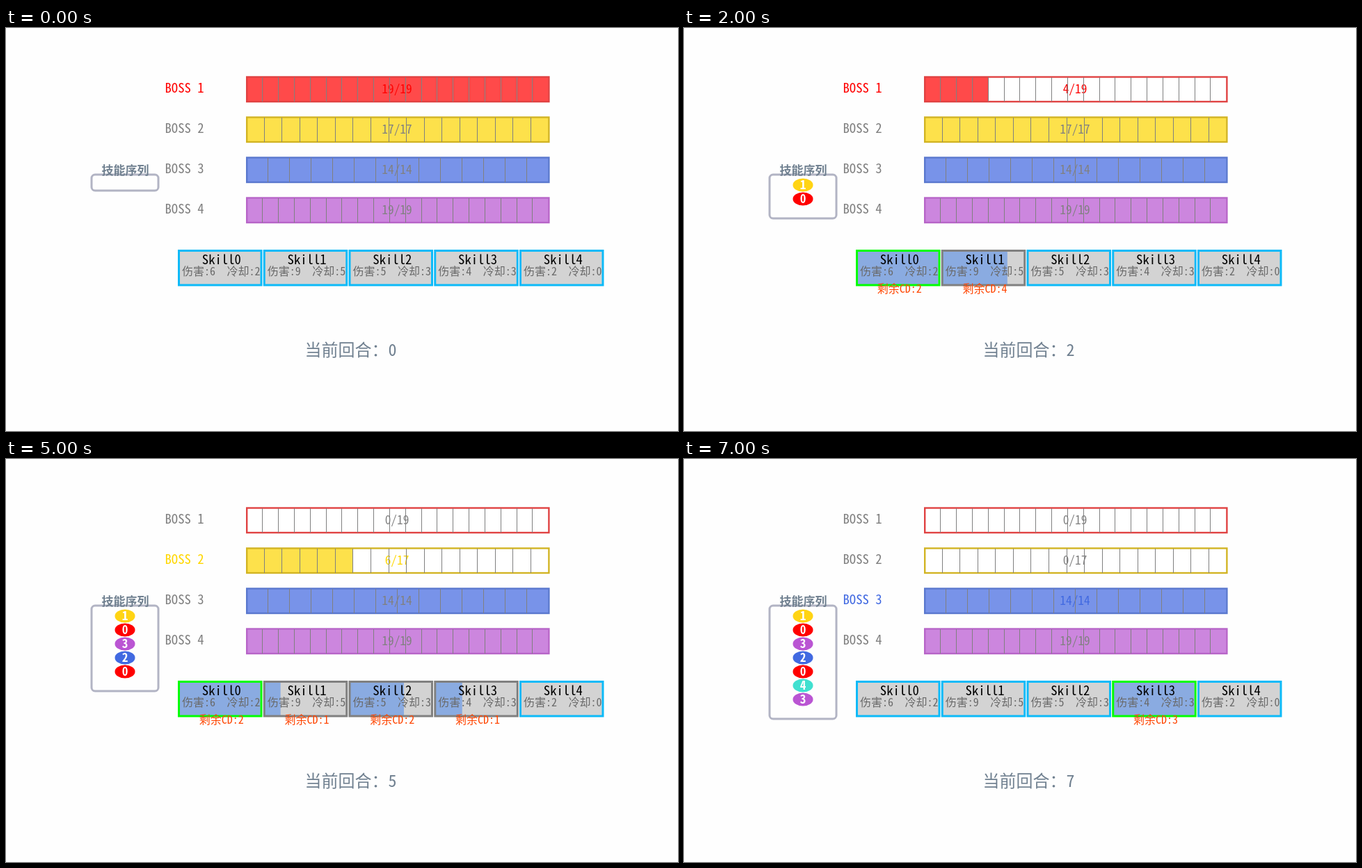
Write an HTML page that moves like this. It is 966 px wide and 580 px high and loops after 8 s.

```html
<!DOCTYPE html>
<html lang="zh-CN">
<head>
<meta charset="utf-8">
<title>Boss battle</title>
<style>
  html, body { margin: 0; width: 100%; height: 100%; overflow: hidden; background: #fefefe; }
  svg { display: block; font-family: "Noto Sans Mono CJK SC", "Noto Sans CJK SC", "Noto Sans CJK", monospace; }
</style>
</head>
<body>
<svg id="stage" width="966" height="580" viewBox="0 0 966 580"></svg>
<script>
const STEP = 1000;
const GRAY = '#808080', SLATE = '#708090';
const bosses = [
  { max: 19, color: '#ff0000', fill: '#ff4a4a', edge: '#e04242' },
  { max: 17, color: '#ffd700', fill: '#fde14b', edge: '#d2b424' },
  { max: 14, color: '#4169e1', fill: '#7893e9', edge: '#5a78ce' },
  { max: 19, color: '#ba55d3', fill: '#cc86de', edge: '#b765c8' },
];
const skills = [
  { damage: 6, cooldown: 2, color: '#ff0000' },
  { damage: 9, cooldown: 5, color: '#ffd414' },
  { damage: 5, cooldown: 3, color: '#4169e1' },
  { damage: 4, cooldown: 3, color: '#ba55d3' },
  { damage: 2, cooldown: 0, color: '#40e0d0' },
];
const moves = [1, 0, 3, 2, 0, 4, 3];

// Battle state after the given number of rounds
function play(rounds) {
  const health = bosses.map(b => b.max);
  const waits = skills.map(() => 0);
  const alive = () => health.findIndex(h => h > 0);
  for (const id of moves.slice(0, rounds)) {
    waits.forEach((w, i) => waits[i] = Math.max(0, w - 1));
    waits[id] = skills[id].cooldown;
    const target = alive();
    health[target] = Math.max(0, health[target] - skills[id].damage);
  }
  return { rounds, health, waits, target: alive(), used: moves[rounds - 1] };
}

const rect = (x, y, w, h, attrs) =>
  `<rect x="${x}" y="${y}" width="${w}" height="${h}" ${attrs}/>`;
const text = (str, x, y, size, color, attrs = '') =>
  `<text x="${x}" y="${y}" font-size="${size}" fill="${color}" ${attrs}>${str}</text>`;
const middle = 'text-anchor="middle"';

function drawBoss(i, { health, target }) {
  const { max, color, fill, edge } = bosses[i];
  const x = 345.8, w = 434, y = 70.5 + 58 * i;
  const ink = i === target ? color : GRAY;
  let lines = '';
  for (let k = 1; k < max; k++) lines += `M${Math.floor(x + w * k / max) + .5} ${y + .5}v35`;
  return rect(x, y, w + .7, 35.5, 'fill="#fff"')
    + rect(x, y, w * health[i] / max, 35.5, `fill="${fill}"`)
    + rect(x + .4, y, w + .2, 35.5, `fill="none" stroke="${edge}" stroke-width="2.4"`)
    + text(`${health[i]}/${max}`, 562, y + 23.5, 17.33, ink, middle)
    + `<path d="${lines}" stroke="${GRAY}"/>`
    + text(`BOSS ${i + 1}`, 228.5, y + 22.8, 18.67, ink);
}

function drawSkill(i, { waits, used }) {
  const { damage, cooldown } = skills[i];
  const x = 248.5 + 122.75 * i, y = 320.5, wait = waits[i];
  const edge = i === used ? '#00ff00' : wait ? GRAY : '#0cbaf8';
  return rect(x, y, 118.5, 49.5, 'fill="#d3d3d3"')
    + (wait ? rect(x, y, 117 * wait / cooldown, 49.5, 'fill="#8aabe1"') : '')
    + rect(x, y, 118.5, 49.5, `fill="none" stroke="${edge}" stroke-width="3"`)
    + text(`Skill${i}`, x + 61.3, 340, 18.67, '#000', middle)
    + text(`伤害:${damage}`, x + 4.5, 356.3, 16, '#696969')
    + text(`冷却:${cooldown}`, x + 69, 356.3, 16, '#696969')
    + (wait ? text(`剩余CD:${wait}`, x + 61.3, 381, 16, '#ff4500', middle) : '');
}

function drawQueue(rounds) {
  const items = moves.slice(0, rounds).map((id, k) => {
    const y = 226 + 20 * k;
    return `<ellipse cx="171" cy="${y}" rx="14.5" ry="9.5" fill="${skills[id].color}"/>`
      + text(id, 171, y + 6.2, 17.33, '#fff', middle + ' font-weight="700"');
  });
  return rect(123, 211, 96, 23 + 20 * rounds, 'rx="5" fill="none" stroke="#b2b4c4" stroke-width="3"')
    + text('技能序列', 171.5, 211, 17, SLATE, middle + ' font-weight="700"')
    + items.join('');
}

const stage = document.getElementById('stage');
let shown = -1;
function frame() {
  const round = Math.floor(performance.now() / STEP) % (moves.length + 1);
  if (round !== shown) {
    shown = round;
    const state = play(round);
    stage.innerHTML = drawQueue(round)
      + bosses.map((_, i) => drawBoss(i, state)).join('')
      + skills.map((_, i) => drawSkill(i, state)).join('')
      + text(`当前回合：${round}`, 429.5, 472, 24, SLATE);
  }
  requestAnimationFrame(frame);
}
frame();
</script>
</body>
</html>
```
